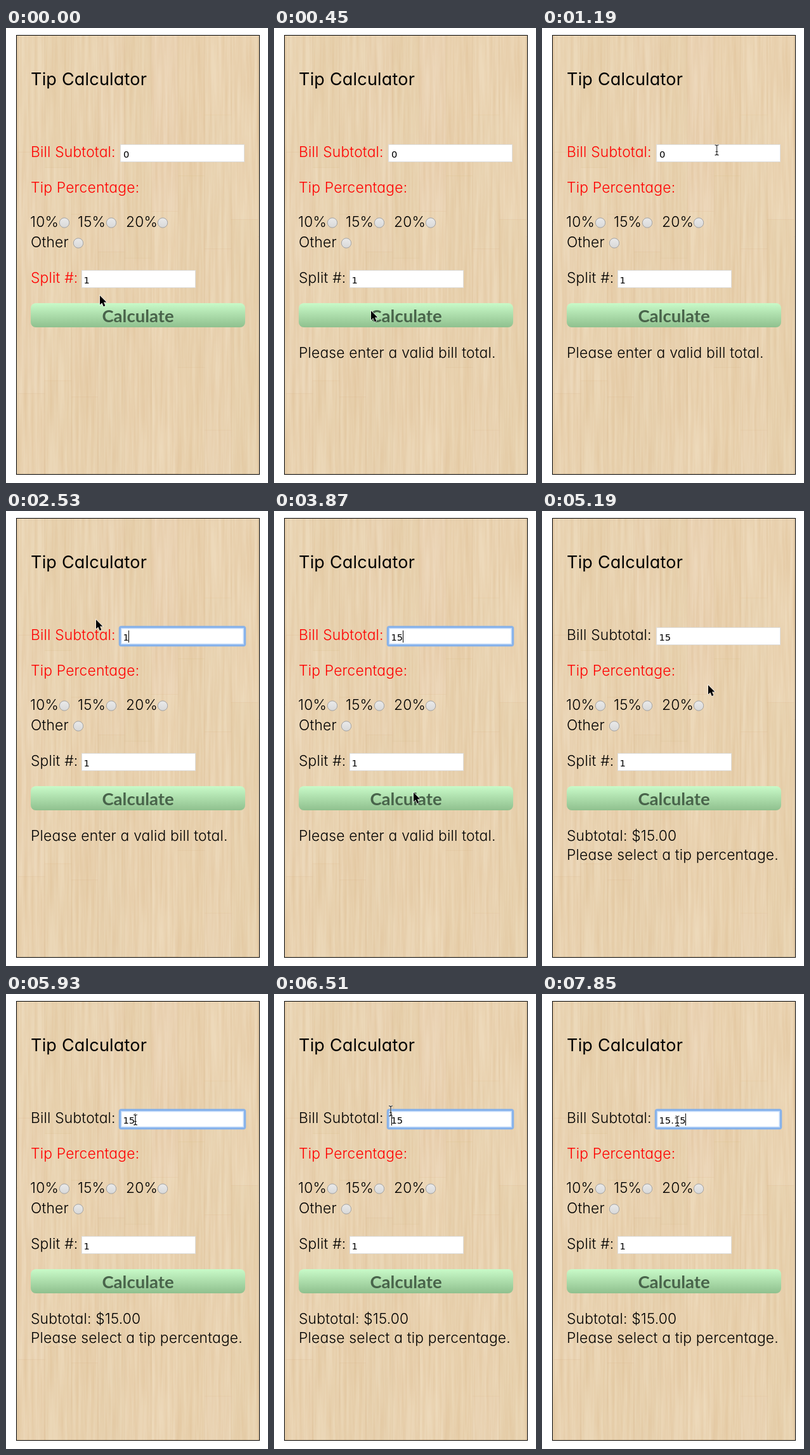
An HTML page for the animation above (8 s loop, 413 px wide and 716 px high).

```html
<!DOCTYPE html>
<html lang="en">
<head>
<meta charset="utf-8">
<title>Tip Calculator</title>
<style>
html, body { margin: 0; width: 100%; height: 100%; overflow: hidden; background: #fff; }
svg { display: block; width: 100%; height: 100%; }
text { font: 300 22.8px Inter, sans-serif; font-feature-settings: "cv11"; letter-spacing: .2px; white-space: pre; }
.title { font-size: 27px; font-weight: 400; }
.value { font: 14.7px "DejaVu Sans", sans-serif; letter-spacing: 0; }
.action { font: 700 27.5px Lato, sans-serif; letter-spacing: 0; fill: #48634a; text-anchor: middle; }
.error { fill: #f00; }
.field { fill: #fff; stroke: #ddd; }
.radio circle { fill: url(#knob); stroke: #a2a2a2; }
.select { fill: #b3d7ff; }
.halo { fill: none; stroke: #fff; stroke-width: 2.6; stroke-opacity: .75; }

.timed { animation: 8s step-end infinite; }
.hidden { opacity: 0; }
#split { animation-name: split; }
#bill { animation-name: bill; }
#button { animation-name: press; transform-origin: 208px 452px; }
#askBill { animation-name: askBill; }
#askTip { animation-name: askTip; }
#focus { animation-name: focus; }
#selZero { animation-name: selZero; }
#selTotal { animation-name: selTotal; }
#zero { animation-name: zero; }
#typed tspan { fill-opacity: 0; animation: 8s step-end infinite; }
#typed tspan:nth-child(1) { animation-name: key1; }
#typed tspan:nth-child(2) { animation-name: key2; }
#typed tspan:nth-child(3) { animation-name: key3; }
#typed tspan:nth-child(4) { animation-name: key4; }
#typed tspan:nth-child(5) { animation-name: key5; }
#caret { animation-name: caret; }
#cursor { animation-name: move; transform: translate(148px, 421px); }
#arrow { animation-name: arrow; }
#beam { animation-name: beam; }

@keyframes split { 5.625% { fill: #000; } 100% { fill: #000; } }
@keyframes bill { 52% { fill: #000; } 100% { fill: #000; } }
@keyframes press {
  3.75%, 50.25% { transform: scale(1.035); }
  5.625%, 52% { transform: none; }
}
@keyframes askBill { 5.625% { opacity: 1; } 52% { opacity: 0; } }
@keyframes askTip { 52%, 100% { opacity: 1; } }
@keyframes focus { 18.625%, 74.125%, 100% { opacity: 1; } 50.25% { opacity: 0; } }
@keyframes selZero { 20.5% { opacity: 1; } 31.625% { opacity: 0; } }
@keyframes selTotal { 77.75% { opacity: 1; } 81.375% { opacity: 0; } }
@keyframes zero { 31.625%, 100% { opacity: 0; } }
@keyframes key1 { 31.625%, 100% { fill-opacity: 1; } }
@keyframes key2 { 35.375%, 100% { fill-opacity: 1; } }
@keyframes key3 { 92.625%, 100% { fill-opacity: 1; } }
@keyframes key4 { 96.25%, 100% { fill-opacity: 1; } }
@keyframes key5 { 98.125%, 100% { fill-opacity: 1; } }
@keyframes caret {
  0%, 20.5%, 42.875%, 50.25%, 77.75%, 90.75% { opacity: 0; transform: none; }
  18.625%, 31.625% { opacity: 1; transform: translate(193px, 0); }
  35.375%, 48.375%, 74.125%, 83.25% { opacity: 1; transform: translate(203px, 0); }
  81.375% { opacity: 1; transform: translate(185px, 0); }
  92.625% { opacity: 1; transform: translate(208px, 0); }
  96.25% { opacity: 1; transform: translate(217px, 0); }
  98.125%, 100% { opacity: 1; transform: translate(226px, 0); }
}
@keyframes arrow {
  14.875%, 68.625%, 81.375%, 100% { opacity: 0; }
  20.5%, 77.75% { opacity: 1; }
}
@keyframes beam {
  14.875%, 68.625%, 81.375%, 100% { opacity: 1; }
  20.5%, 77.75% { opacity: 0; }
}
@keyframes move {
  1.875% { transform: translate(151px, 435px); }
  3.75% { transform: translate(153px, 445px); }
  7.5% { transform: translate(154px, 447px); }
  11.125% { transform: translate(186px, 375px); }
  13% { transform: translate(246px, 252px); }
  14.875% { transform: translate(275.5px, 192px); }
  16.75% { transform: translate(240px, 196px); }
  18.625% { transform: translate(206px, 198px); }
  20.5% { transform: translate(176px, 182px); }
  22.375% { transform: translate(152px, 166px); }
  24.25% { transform: translate(141px, 165px); }
  31.625% { transform: translate(142px, 171px); }
  39.125% { transform: translate(165px, 240px); }
  41% { transform: translate(200px, 345px); }
  42.875% { transform: translate(227px, 424px); }
  44.625% { transform: translate(232px, 444px); }
  48.375% { transform: translate(220px, 443px); }
  53.875% { transform: translate(222px, 455px); }
  59.375% { transform: translate(225px, 464px); }
  63.125% { transform: translate(243px, 380px); }
  64.875% { transform: translate(262px, 274px); }
  66.75% { transform: translate(258px, 222px); }
  68.625% { transform: translate(240px, 199px); }
  70.5% { transform: translate(222px, 198px); }
  72.25% { transform: translate(210px, 198px); }
  74.125% { transform: translate(204px, 198px); }
  76% { transform: translate(190px, 196px); }
  77.75% { transform: translate(160px, 178px); }
  79.625% { transform: translate(172px, 180px); }
  81.375% { transform: translate(184px, 184px); }
  83.25% { transform: translate(203px, 196px); }
  85.125%, 100% { transform: translate(213.5px, 200px); }
}
</style>
</head>
<body>
<svg viewBox="0 0 413 716">
  <defs>
    <linearGradient id="green" x2="0" y2="1">
      <stop stop-color="#c8fac8"/><stop offset="1" stop-color="#8fc08e"/>
    </linearGradient>
    <linearGradient id="knob" x2="0" y2="1">
      <stop stop-color="#eaeaea"/><stop offset="1" stop-color="#d8d8d8"/>
    </linearGradient>
    <filter id="grain" x="0" y="0" width="1" height="1" color-interpolation-filters="sRGB">
      <feTurbulence type="fractalNoise" baseFrequency=".2 .008" numOctaves="3" seed="4"/>
      <feColorMatrix values="0 0 0 0 .8  0 0 0 0 .62  0 0 0 0 .4  .4 0 0 0 -.1"/>
    </filter>
    <clipPath id="board"><rect x="16" y="11" width="384" height="692"/></clipPath>
    <path id="ibeam" d="M-3-8Q0-8 0-6Q0-8 3-8M0-6V6M-3 8Q0 8 0 6Q0 8 3 8M-1.7 2.5H1.7"/>
  </defs>

  <g clip-path="url(#board)">
    <rect x="16" y="11" width="384" height="692" fill="#ebd7b8"/>
    <g id="planks"></g>
    <rect x="16" y="11" width="384" height="692" filter="url(#grain)"/>
  </g>
  <rect x="16.5" y="11.5" width="383" height="691" fill="none" stroke="#000"/>

  <text class="title" x="39" y="90">Tip Calculator</text>

  <text id="bill" class="error timed" x="39" y="203">Bill Subtotal:</text>
  <rect class="field" x="180.5" y="183.5" width="195" height="27"/>
  <g id="focus" class="timed hidden" fill="none" stroke="#78adf2">
    <rect x="180" y="183" width="196" height="28" rx="2" stroke-width="5" stroke-opacity=".45"/>
    <rect x="179.5" y="182.5" width="197" height="29" rx="2" stroke-width="3" stroke-opacity=".75"/>
  </g>
  <rect id="selZero" class="select timed hidden" x="185" y="188" width="9.5" height="19"/>
  <rect id="selTotal" class="select timed hidden" x="185" y="188" width="19" height="19"/>
  <text id="zero" class="value timed" x="185" y="204">0</text>
  <text id="typed" class="value" x="184.5" y="204"><tspan>1</tspan><tspan>5</tspan><tspan>.</tspan><tspan>1</tspan><tspan>5</tspan></text>
  <rect id="caret" class="timed hidden" y="188" width="1" height="19"/>

  <text class="error" x="39" y="259">Tip Percentage:</text>
  <text x="38" y="313">10%</text>
  <text x="113" y="313">15%</text>
  <text x="189" y="313">20%</text>
  <text x="39" y="345">Other</text>
  <g class="radio">
    <circle cx="92" cy="306.5" r="7.7"/>
    <circle cx="166" cy="306.5" r="7.7"/>
    <circle cx="247" cy="306.5" r="7.7"/>
    <circle cx="114" cy="338.5" r="7.7"/>
  </g>

  <text id="split" class="error timed" x="39" y="401">Split #:</text>
  <rect class="field" x="119.5" y="381.5" width="179" height="27"/>
  <text class="value" x="122.5" y="402">1</text>

  <g id="button" class="timed">
    <rect x="39" y="433" width="338" height="38" rx="8" fill="url(#green)"/>
    <text class="action" x="208" y="463">Calculate</text>
  </g>

  <text id="askBill" class="timed hidden" x="39" y="519">Please enter a valid bill total.</text>
  <g id="askTip" class="timed hidden">
    <text x="39" y="519">Subtotal: $15.00</text>
    <text x="39" y="549">Please select a tip percentage.</text>
  </g>

  <g id="cursor" class="timed">
    <path id="arrow" class="timed" d="M0 0V14.5L3.3 11.5L5.8 17.2L8.4 16L6 10.5H10.4Z" stroke="#fff" stroke-width="1.2" paint-order="stroke"/>
    <g id="beam" class="timed hidden">
      <use href="#ibeam" class="halo"/>
      <use href="#ibeam" fill="none" stroke="#111" stroke-width="1.1"/>
    </g>
  </g>
</svg>
<script>
const planks = document.getElementById('planks');
let seed = 11;
const random = () => (seed = seed * 16807 % 2147483647) / 2147483647;

function plank(x, y, height) {
  const rect = document.createElementNS('http://www.w3.org/2000/svg', 'rect');
  const attrs = {
    x, y, height, width: 42,
    fill: random() < .5 ? '#f2e2c6' : '#e2c69a',
    'fill-opacity': .04 + random() * .1,
    stroke: '#c9a673', 'stroke-opacity': .1, 'stroke-width': .8
  };
  for (const name in attrs) rect.setAttribute(name, attrs[name]);
  planks.append(rect);
}

for (let x = -23; x < 400; x += 42) {
  for (let y = -random() * 250; y < 703;) {
    const height = 180 + random() * 280;
    plank(x, y, height);
    y += height;
  }
}
</script>
</body>
</html>
```
